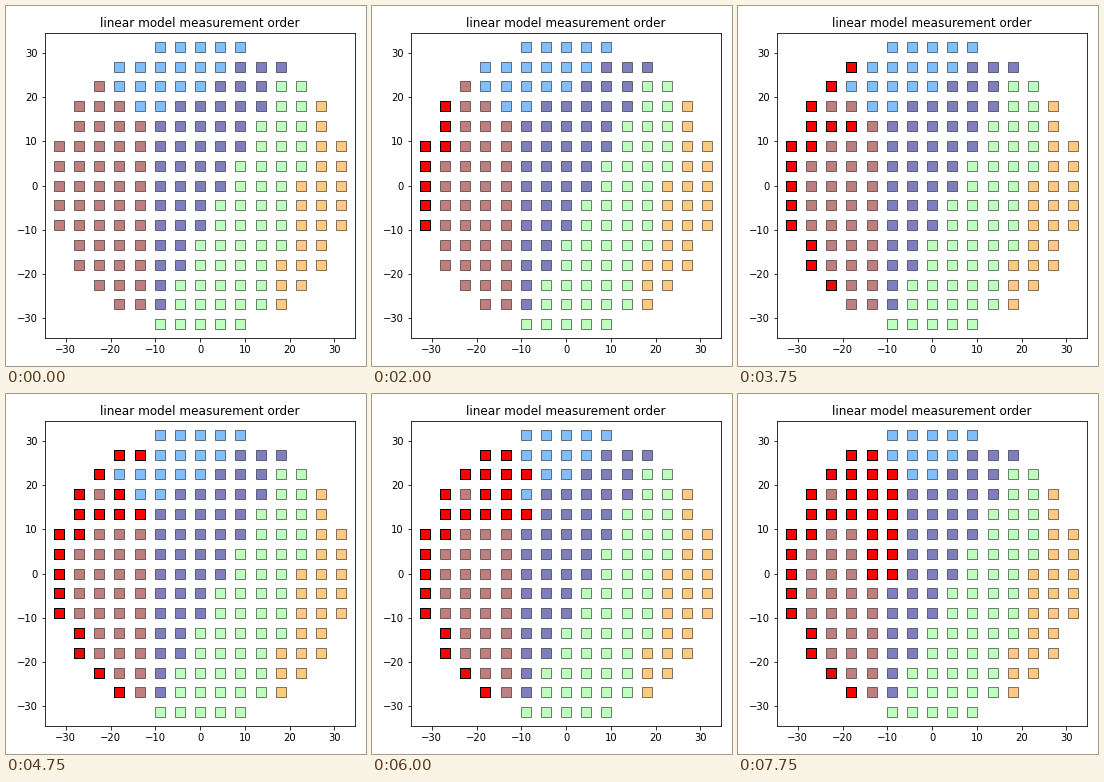
A matplotlib script that plays this animation: 360x360 px, repeating every 8 s.

```python
import numpy as np
import matplotlib.pyplot as plt
from matplotlib.animation import FuncAnimation

STEP = 4.5
N = 7
STEPS = 32
# Group values on the colour map
DARK, BLUE, GREEN, ORANGE, BROWN = range(5)


def group(col, row):
    if col <= -3 and col + row < 1:
        return BROWN
    if col < 1.5 * row - 7:
        return BLUE
    if col < row // 2 + 2:
        return DARK
    if col < (row + 3) // 4 + 5:
        return GREEN
    return ORANGE


down = range(N, -N - 1, -1)
cells = {(c, r): group(c, r) for r in down for c in range(-N, N + 1)
         if c * c + r * r <= 53}


def is_edge(col, row):
    """True on the outer rim, or where the right neighbour differs."""
    around = [(col - 1, row), (col, row + 1), (col, row - 1)]
    right = cells[col + 1, row]
    return any(p not in cells for p in around) or right != cells[col, row]


def measurement_route():
    route = []

    def visit(*cell):
        if cell not in route:
            route.append(cell)

    # Left edge, column by column, each with one step inwards
    for col in range(-N, -3):
        rows = [r for r in down if (col, r) in cells]
        for row in rows:
            if is_edge(col, row):
                visit(col, row)
            if row == min(3, rows[0]):
                visit(col + 1, row)

    # Down the group border, with the diagonal neighbours beyond it
    for row in range(6, -1, -1):
        visit(-3, row)
        if row <= 4:
            for near in (row + 1, row - 1):
                for col in (-4, -2):
                    if cells[col, near] != BROWN:
                        visit(col, near)
    return route[:STEPS - 1]


grid = np.array(list(cells)) * STEP
path = np.array(measurement_route()) * STEP

fig, ax = plt.subplots(figsize=(5, 5), dpi=72)
ax.scatter(*grid.T, c=list(cells.values()), cmap="jet",
           marker="s", s=100, edgecolors="k", alpha=0.5)
ax.set_title("linear model measurement order")
limit = 1.1 * N * STEP
ax.set_xlim(-limit, limit)
ax.set_ylim(-limit, limit)
done = ax.scatter(*path.T, c="red", marker="s", s=100, edgecolors="k")
fig.tight_layout()
fig.subplots_adjust(left=38.93 / 360)


def update(frame):
    done.set_offsets(path[:frame])
    return [done]


anim = FuncAnimation(fig, update, frames=STEPS, interval=250,
                     repeat=True, repeat_delay=0)
plt.show()
```
